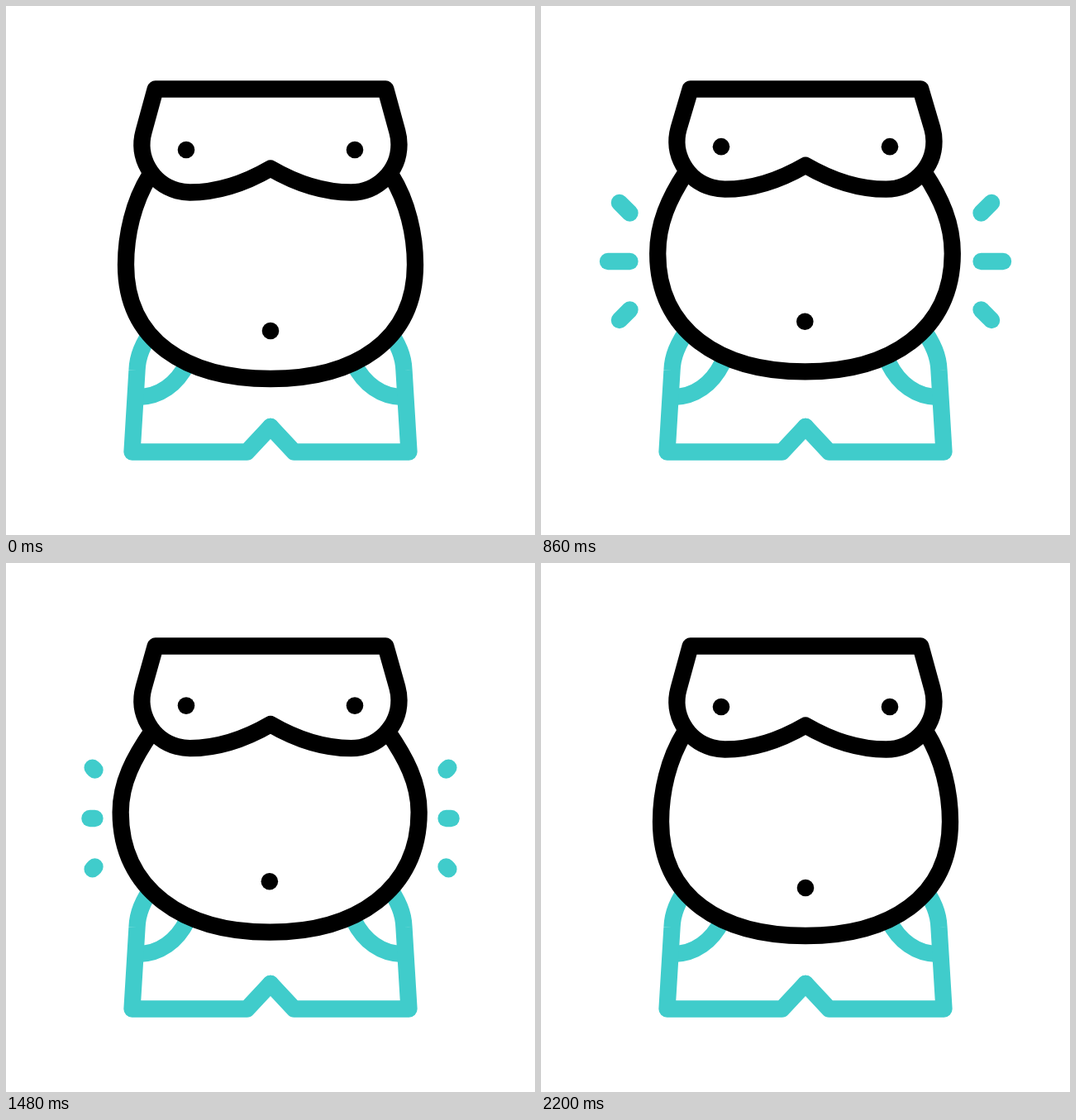
Write an HTML page with a canvas that moves like this. It is 640 px wide and 640 px high and loops after 2.4 s.

```html
<!DOCTYPE html>
<html lang="en">
<head>
<meta charset="utf-8">
<title>Belly bounce</title>
<style>
html, body { margin: 0; width: 100%; height: 100%; overflow: hidden; background: #fff; }
canvas { display: block; width: 100vmin; height: 100vmin; margin: auto; }
</style>
</head>
<body>
<canvas id="stage" width="640" height="640"></canvas>
<script>
const ctx = document.getElementById('stage').getContext('2d');
const LOOP = 2400, START = 200, STEP = 500, BOUNCE = 7.5;
const TEAL = '#40cccb', BLACK = '#000';

const ease = u => { u = Math.min(1, Math.max(0, u)); return u * u * (3 - 2 * u); };
const mix = (a, b, s) => a + (b - a) * s;

function stroke(path, color, cap = 'butt', fill) {
  ctx.lineCap = cap;
  ctx.strokeStyle = color;
  if (fill) { ctx.fillStyle = fill; ctx.fill(path); }
  ctx.stroke(path);
}

function dot(x, y) {
  ctx.fillStyle = BLACK;
  ctx.beginPath();
  ctx.arc(x, y, 10.3, 0, 7);
  ctx.fill();
}

function bothSides(draw) {
  draw();
  ctx.save();
  ctx.translate(640, 0);
  ctx.scale(-1, 1);
  draw();
  ctx.restore();
}

// Rest, up, down and wide, up, rest: vertical offset and widening.
function poseAt(t) {
  const rise = ease((t - START) / STEP) - ease((t - START - 3 * STEP) / STEP);
  const wide = ease((t - START - STEP) / STEP) - ease((t - START - 2 * STEP) / STEP);
  return { dy: BOUNCE * (2 * wide - rise), wide };
}

function drawRays(t) {
  for (const grow of [607, 1387]) {
    const end = ease((t - grow) / 328), start = ease((t - grow - 295) / 328);
    if (end <= start) continue;
    bothSides(() => {
      for (const k of [-1, 0, 1]) {
        const at = s => [mix(107.5, k ? 93 : 77, s), 309 + k * mix(58.5, 73, s)];
        const ray = new Path2D();
        ray.moveTo(...at(start));
        ray.lineTo(...at(end));
        stroke(ray, TEAL, 'round');
      }
    });
  }
}

const pocket = new Path2D('M160 473C186 473 207 457 219 433L224 420');
const shorts = new Path2D('M320 509L291.5 539.5H152.5L158.5 441C159 425 164 410 182 385');

function drawShorts() {
  bothSides(() => {
    stroke(pocket, TEAL);
    stroke(shorts, TEAL, 'round');
  });
}

function drawBelly({ dy, wide }) {
  const shift = -2.1 * wide, side = 145 - 13.5 * wide;
  const shoulderY = 205 + dy;
  const sideY = 313 + 2.2 * dy - 20.8 * wide;
  const bottomY = 451 + 2 * dy - 3.7 * wide;
  const half = [
    [174 + 9 * wide, shoulderY], [154 + 4 * wide, shoulderY + 32], [side, sideY - 36],
    [side, sideY], [side, sideY + 92 + 4 * wide], [218 - 7 * wide, bottomY], [320, bottomY]
  ];
  const other = half.slice(0, -1).reverse().map(([x, y]) => [640 - x, y]);
  const pts = [...half, ...other].map(([x, y]) => [x + shift, y]);
  const path = new Path2D();
  path.moveTo(...pts[0]);
  for (let i = 1; i < pts.length; i += 3) path.bezierCurveTo(...pts[i], ...pts[i + 1], ...pts[i + 2]);
  stroke(path, BLACK, 'butt', '#fff');
  dot(320 - 2.8 * wide, 393 + 2.2 * dy - 11.5 * wide);
}

function drawChest(dy) {
  const r = 58, tilt = 0.27, cx = 222.5, cy = 167.5 + dy, low = cy + r;
  const path = new Path2D();
  path.moveTo(180.7, 100.5);
  path.arc(cx, cy, r, Math.PI + tilt, Math.PI / 2, true);
  path.quadraticCurveTo(270, low, 320, 196.5 + dy);
  path.quadraticCurveTo(370, low, 640 - cx, low);
  path.arc(640 - cx, cy, r, Math.PI / 2, -tilt, true);
  path.lineTo(459.3, 100.5);
  path.closePath();
  stroke(path, BLACK, 'butt', '#fff');
  bothSides(() => dot(218, 174 + dy));
}

function draw(t) {
  const pose = poseAt(t);
  ctx.clearRect(0, 0, 640, 640);
  ctx.lineWidth = 20.3;
  ctx.lineJoin = 'round';
  drawRays(t);
  drawShorts();
  drawBelly(pose);
  drawChest(pose.dy);
}

const began = performance.now();
function frame() {
  draw((performance.now() - began) % LOOP);
  requestAnimationFrame(frame);
}
frame();
</script>
</body>
</html>
```
